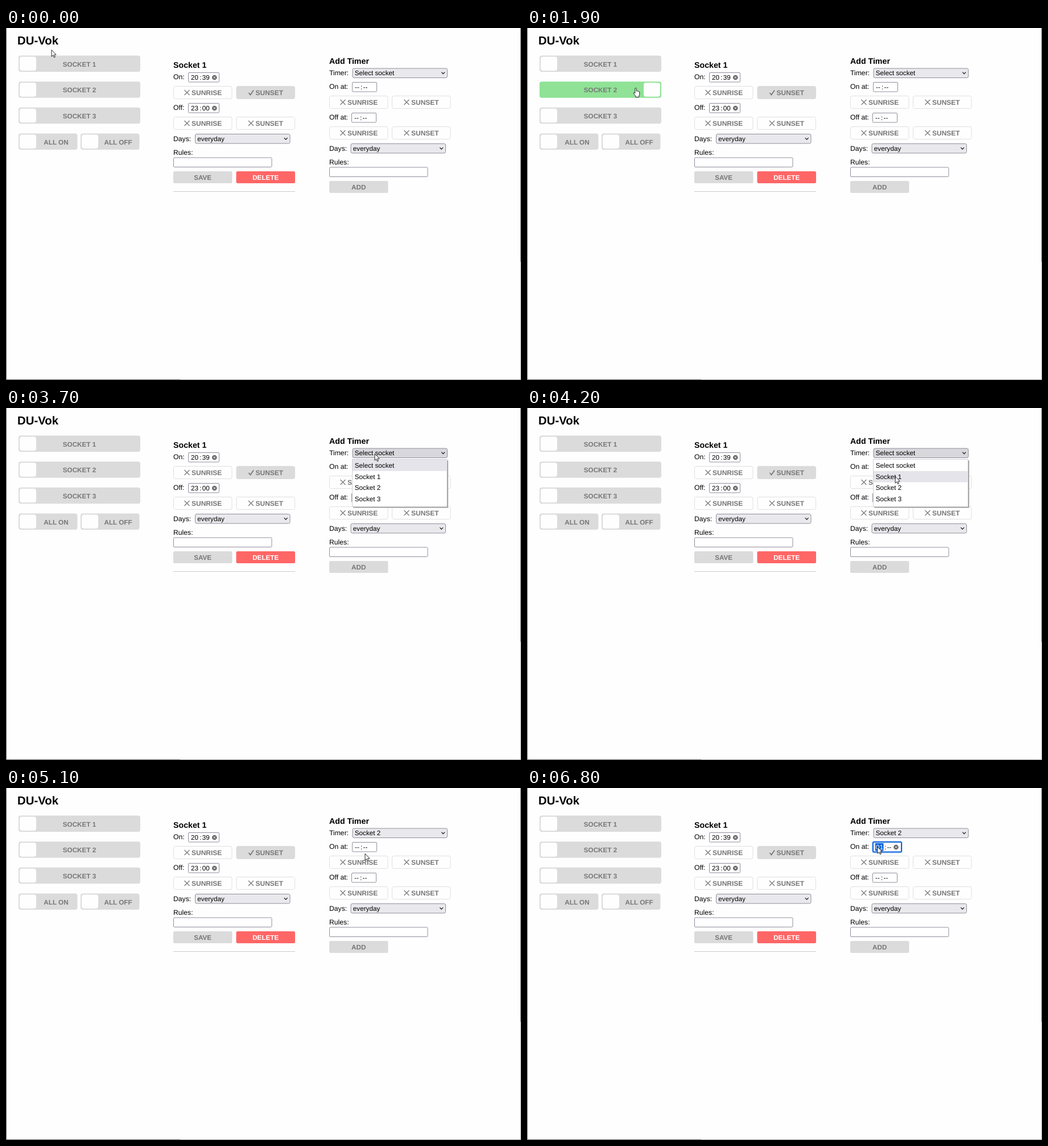
Write an HTML page that moves like this. It is 905 px wide and 619 px high and loops after 8000 ms.

```html
<!DOCTYPE html>
<html lang="en">
<head>
<meta charset="utf-8">
<title>Socket timers</title>
<style>
  html, body { margin: 0; width: 100%; height: 100%; overflow: hidden; background: #fefefe; }
  svg { display: block; font: 11.7px "Liberation Sans", Arial, sans-serif; text-rendering: geometricPrecision; }
  text { white-space: pre; }
</style>
</head>
<body>
<svg id="stage" width="905" height="619" viewBox="0 0 905 619">
  <g id="page"></g>
  <g id="live"></g>
</svg>
<script>
const GRAY = '#dbdbdb', INK = '#777', BORDER = '#8f8f9d', BLUE = '#0a63d8';

const rect = (x, y, w, h, fill, extra = '') =>
  `<rect x="${x}" y="${y}" width="${w}" height="${h}" fill="${fill}" ${extra}/>`;
const text = (x, y, s, size = 11.7, fill = '#000', extra = '') =>
  `<text x="${x}" y="${y}" font-size="${size}" fill="${fill}" ${extra}>${s}</text>`;
const stroke = (d, color, width) =>
  `<path d="${d}" fill="none" stroke="${color}" stroke-width="${width}"/>`;
const label = (x, y, s) => text(x, y, s, 12.2);
const heading = (x, y, s, size = 14.2) => text(x, y, s, size, '#000', 'font-weight="700"');
const caption = (x, y, s, fill = INK) =>
  text(x, y, s, 11.7, fill, 'font-weight="700" text-anchor="middle"');

function toggle(x, y, w, name, center, on) {
  return rect(x, y, w, 28.5, on ? '#8fe296' : GRAY, 'rx="4"') +
    rect(on ? x + w - 31 : x + 2, y + 2, 29, 24.5, '#fefefe', 'rx="4"') +
    caption(center, y + 19, name);
}

function sunButton(x, y, name, on) {
  const dx = name === 'SUNSET' ? 2 : 0, cx = x + 24 + dx, cy = y + 11.5;
  const mark = on
    ? stroke(`M${cx - 4} ${cy + .5}l3 3.5 5.5-8`, INK, 1.8)
    : stroke(`M${cx - 4.5} ${cy - 4.5}l9 9m0-9l-9 9`, INK, 1.2);
  return rect(x + .5, y + .5, 102.5, 22, on ? GRAY : '#fefefe', `rx="3" stroke="${on ? GRAY : '#e0e0e0'}"`) +
    mark + text(x + 32 + dx, y + 15.7, name, 12, INK, 'font-weight="700"');
}

const sunRow = (x, x2, y, sunset) => sunButton(x, y, 'SUNRISE') + sunButton(x2, y, 'SUNSET', sunset);

const button = (x, y, name, fill = GRAY, ink = INK) =>
  rect(x, y, 103.5, 21, fill, 'rx="2.5"') + caption(x + 51.7, y + 14.7, name, ink);

const field = (x, y, w) => rect(x + .5, y + .5, w - 1, 16.5, '#fff', `rx="1.5" stroke="${BORDER}"`);

const select = (x, y, s, fill = '#e9e9ed') =>
  rect(x + .5, y + .5, 166.5, 16.5, fill, `rx="2.5" stroke="${BORDER}"`) +
  text(x + 4.3, y + 12.8, s) +
  stroke(`M${x + 156.8} ${y + 7.2}l2.9 3 2.9-3`, '#111', 1.2);

function timeField(x, y, hour, minute, focus) {
  const digits = hour !== '--', w = digits ? (focus ? 50 : 55) : 44;
  const end = x + 5 + (digits ? 13 : 7.8), cx = x + (focus ? 40.5 : 46.3), cy = y + 9;
  let s = focus
    ? rect(x - 2, y - 2, w + 4, 22, '#cfe2fa', 'rx="4"') +
      rect(x, y, w, 17.5, '#fff', `rx="2" stroke="${BLUE}" stroke-width="2"`) +
      rect(x + 4, y + 2, end - x - 3.5, 13.5, BLUE)
    : field(x, y, w);
  s += text(x + 5, y + 13, hour, 11.7, focus ? '#fff' : '#000') +
    text(end + 2.2, y + 13, ':') + text(end + 6.7, y + 13, minute);
  if (digits) s += `<circle cx="${cx}" cy="${cy}" r="4.3" fill="#666"/>` +
    stroke(`M${cx - 1.7} ${cy - 1.7}l3.4 3.4m0-3.4l-3.4 3.4`, '#fff', 1);
  return s;
}

const page = document.getElementById('page'), live = document.getElementById('live');

page.innerHTML =
  rect(0, 0, 905, 619, '#fefefe') +
  rect(0, 0, 1, 619, '#666') + rect(904, 0, 1, 411, '#555') + rect(904, 411, 1, 208, '#aaa') +
  rect(0, 618, 306, 1, '#555') + rect(306, 618, 599, 1, '#999') +
  heading(20, 28.5, 'DU-Vok', 20.4) +
  toggle(22, 48.5, 214, 'SOCKET 1', 129) +
  toggle(22, 139.8, 214, 'SOCKET 3', 129) +
  toggle(22, 185.5, 103.5, 'ALL ON', 88) +
  toggle(131, 185.5, 103.5, 'ALL OFF', 197) +

  heading(294, 70.3, 'Socket 1') +
  label(294, 90, 'On:') + timeField(320, 78, '20', '39') +
  sunRow(294, 404.5, 102, true) +
  label(294, 144.3, 'Off:') + timeField(320, 132, '23', '00') +
  sunRow(294, 404.5, 156) +
  label(294, 198.7, 'Days:') + select(332, 186, 'everyday') +
  label(294, 222.5, 'Rules:') + field(294, 227.5, 173.5) +
  button(294, 252, 'SAVE') + button(404.5, 252, 'DELETE', '#ff6666', '#fff') +
  rect(294, 287, 214, 1, '#ccc') +

  heading(568, 63.3, 'Add Timer') +
  label(568, 83, 'Timer:') + label(568, 107, 'On at:') +
  sunRow(568, 678, 119) +
  label(568, 161.2, 'Off at:') + timeField(607, 149, '--', '--') +
  sunRow(568, 678, 173) +
  label(568, 215.7, 'Days:') + select(605.5, 203, 'everyday') +
  label(568, 239.7, 'Rules:') + field(568, 244.5, 173.5) +
  button(568, 269, 'ADD');

// Pointer path: time, x, y
const path = [
  [0, 80, 38], [400, 135, 74], [800, 203, 102], [1600, 203, 102], [1700, 192, 104],
  [1800, 192, 104], [1900, 191, 105.5], [2500, 191, 105.5], [2800, 390, 99], [3100, 611, 91],
  [3300, 648, 80], [3700, 648, 80], [4300, 647, 128], [4500, 646, 135], [4800, 646, 135],
  [5100, 631, 115], [5500, 616, 103], [8000, 616, 103]
];

function pointerAt(t) {
  const i = path.findIndex(p => p[0] > t), [t0, x0, y0] = path[i - 1], [t1, x1, y1] = path[i];
  const k = (t - t0) / (t1 - t0);
  return [x0 + (x1 - x0) * k, y0 + (y1 - y0) * k];
}

function pointer(x, y) {
  const hand = x > 22 && x < 236 && [48.5, 94, 139.8].some(top => y > top && y < top + 28.5);
  const d = hand
    ? 'M-1.2 9.5V1Q-1.2 0 0 0T1.2 1V5.5Q2.3 4.5 3.3 5.8 4.6 5.1 5.3 6.4 6.8 6 6.8 7.5V11L5.8 14V16H-.2V14L-3.5 10Q-4.4 8.5-3.2 8.2T-1.2 9.5Z'
    : 'M0 .5V12.2L2.7 9.7 4.4 13.8 6.3 13 4.6 9H8.2Z';
  return `<path d="${d}" transform="translate(${x} ${y})" fill="#fff" stroke="#111" stroke-width=".9" stroke-linejoin="round"/>`;
}

function popup(y) {
  const row = Math.max(0, Math.min(3, Math.floor((y - 91) / 19.8)));
  return rect(610, 92, 167, 83.5, '#999', 'rx="1"') +
    rect(608.5, 90.5, 166.5, 83, '#fff', 'stroke="#d0d0d4"') +
    rect(609, 91 + row * 19.8, 165.5, 19.8, '#e5e4ea') +
    ['Select socket', 'Socket 1', 'Socket 2', 'Socket 3']
      .map((s, i) => text(612.8, 104.8 + i * 19.8, s)).join('');
}

function draw(t) {
  const [x, y] = pointerAt(t);
  const hover = t >= 3300 && t < 4900;
  live.innerHTML =
    toggle(22, 94.2, 214, 'SOCKET 2', 129, t >= 1100 && t < 2300) +
    select(608.5, 70.5, t < 4700 ? 'Select socket' : 'Socket 2', hover ? '#d8d8dc' : '#e9e9ed') +
    timeField(608, 95, t < 6800 ? '--' : '01', '--', t >= 5800) +
    (t >= 3500 && t < 4700 ? popup(y) : '') +
    pointer(x, y);
}

let shown = -1;
function tick() {
  const t = Math.floor(performance.now() % 8000 / 100) * 100;
  if (t !== shown) draw(shown = t);
  requestAnimationFrame(tick);
}
tick();
</script>
</body>
</html>
```
